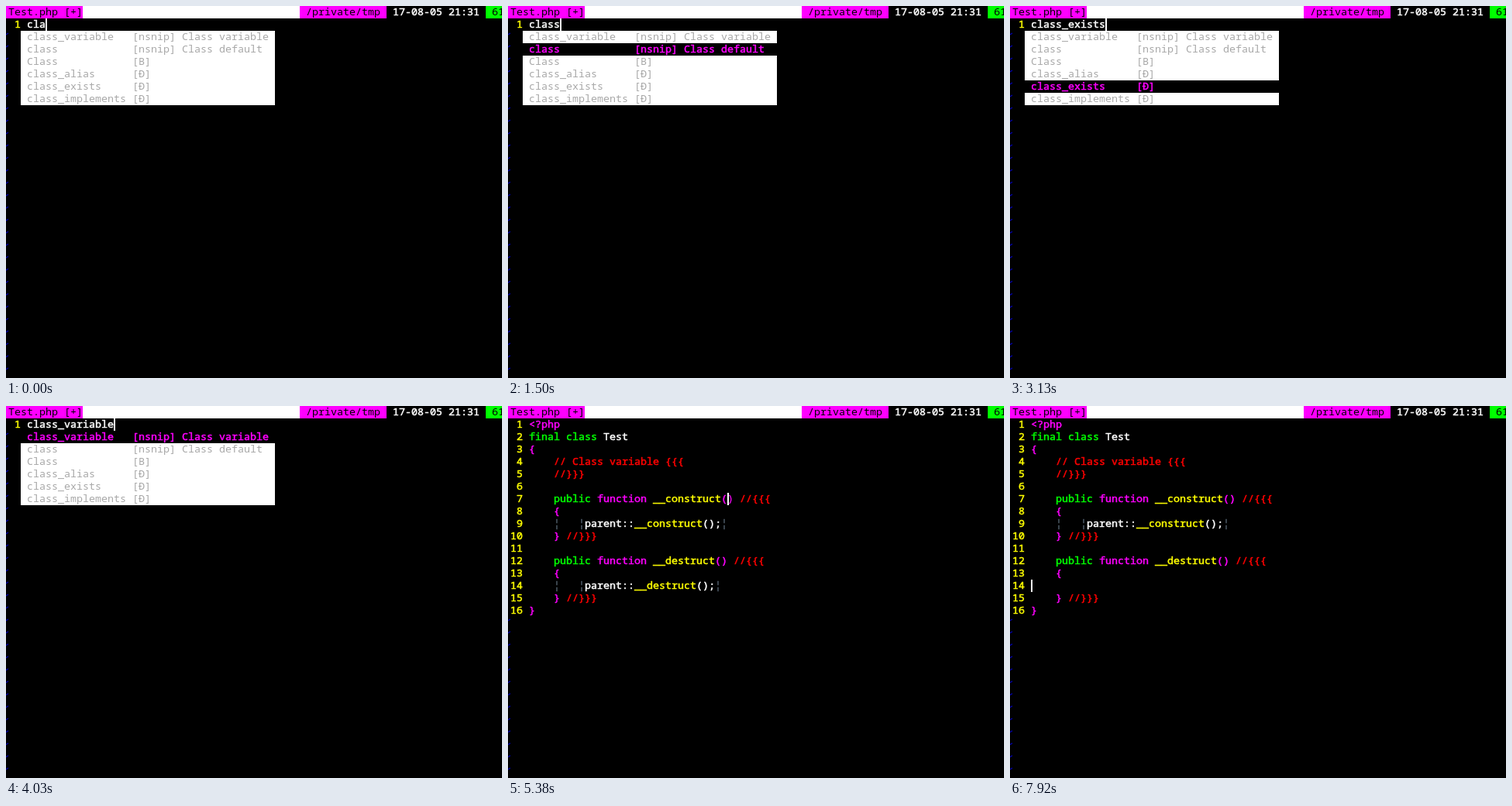
Animation of 640 by 480 pixels, one loop 8 s. Source, as an HTML page with a canvas:

```html
<!DOCTYPE html>
<html lang="en">
<head>
<meta charset="utf-8">
<title>Editor completion</title>
<style>
html, body { margin: 0; width: 100%; height: 100%; overflow: hidden; background: #000; }
canvas { display: block; }
</style>
</head>
<body>
<canvas id="stage" width="640" height="480"></canvas>
<script>
const ctx = document.getElementById('stage').getContext('2d');
const LOOP = 8000, CELL_W = 8, CELL_H = 16, LEFT = 3;
const WHITE = '#fff', BLACK = '#000', MAGENTA = '#f0f', GREEN = '#0f0';
const YELLOW = '#ff0', RED = '#f00', GREY = '#a8a8a8', GUIDE = '#4c5a66', BLUE = '#0000b0';
const THIN = 0, THICK = 0.5;

const menu = [
  ['class_variable', '[nsnip] Class variable'],
  ['class', '[nsnip] Class default'],
  ['Class', '[B]'],
  ['class_alias', '[Đ]'],
  ['class_exists', '[Đ]'],
  ['class_implements', '[Đ]']
];

// Menu choice from each time on; -1 means nothing is chosen.
const choices = [
  [0, -1], [1050, 0], [1500, 1], [2090, 2], [2240, 3],
  [3130, 4], [3430, 5], [3580, -1], [4030, 0], [4330, 1]
];
const cursorOff = [[750, 900], [2990, 3130], [5080, 5380], [6120, 6420]];

const EXPAND = 5380, VISUAL = 6570, PENDING = 7020, CLEARED = 7170;

function method(name) {
  return [
    [7, ['public ', GREEN], ['function ', MAGENTA], ['__' + name, YELLOW], ['() ', MAGENTA], ['//{{{', RED]],
    [7, ['{', MAGENTA]],
    [7, ['¦   ¦', GUIDE], ['parent::', WHITE], ['__' + name, YELLOW], ['();', WHITE], ['¦', GUIDE]],
    [7, ['} ', MAGENTA], ['//}}}', RED]]
  ];
}

const code = [
  [3, ['<?php', MAGENTA]],
  [3, ['final class ', GREEN], ['Test', WHITE]],
  [3, ['{', MAGENTA]],
  [7, ['// Class variable {{{', RED]],
  [7, ['//}}}', RED]],
  [3],
  ...method('construct'),
  [3],
  ...method('destruct'),
  [3, ['}', MAGENTA]]
];

const cellX = col => LEFT + col * CELL_W;

function rect(x, y, w, h, color) {
  ctx.fillStyle = color;
  ctx.fillRect(x, y, w, h);
}

function fillCells(col, row, count, color) {
  rect(cellX(col), row * CELL_H, count * CELL_W, CELL_H, color);
}

// Light text on black gets a fine outline, as font smoothing thickens it.
function write(text, col, row, color, outline = THICK) {
  ctx.font = '13.33px "Noto Sans Mono", "DejaVu Sans Mono", monospace';
  ctx.fillStyle = ctx.strokeStyle = color;
  ctx.lineWidth = outline || 1;
  ctx.lineJoin = 'round';
  const y = row * CELL_H + 12;
  [...text].forEach((ch, i) => {
    if (ch === ' ') return;
    ctx.fillText(ch, cellX(col + i), y);
    if (outline) ctx.strokeText(ch, cellX(col + i), y);
  });
}

function writeRuns([col, ...runs], row) {
  for (const [text, color] of runs) {
    write(text, col, row, color);
    col += text.length;
  }
}

function drawCursor(t, col, row) {
  if (cursorOff.some(([from, to]) => t >= from && t < to)) return;
  rect(cellX(col), row * CELL_H, 2, CELL_H, WHITE);
}

function drawStatus() {
  rect(0, 0, 640, CELL_H, WHITE);
  rect(0, 0, cellX(12), CELL_H, MAGENTA);
  write('Test.php [+]', 0, 0, BLACK, THIN);
  fillCells(47, 0, 14, MAGENTA);
  write('/private/tmp', 48, 0, BLACK, THIN);
  fillCells(61, 0, 16, BLACK);
  write('17-08-05 21:31', 62, 0, WHITE);
  fillCells(77, 0, 3, GREEN);
  write('61', 78, 0, BLACK, THIN);
}

// The visible tail of a tilde cut off by the left edge.
function drawTilde(row) {
  const y = row * CELL_H;
  ctx.strokeStyle = BLUE;
  ctx.lineWidth = 1.3;
  ctx.beginPath();
  ctx.moveTo(0, y + 5);
  ctx.lineTo(3, y + 3);
  ctx.stroke();
}

function drawLineNumbers(count) {
  for (let n = 1; n <= count; n++) write(String(n).padStart(2), 0, n, YELLOW);
  for (let row = count + 1; row < 30; row++) drawTilde(row);
}

function drawCompletion(t) {
  const chosen = choices.filter(([from]) => from <= t).pop()[1];
  const typed = chosen < 0 ? 'cla' : menu[chosen][0];
  drawLineNumbers(1);
  write(typed, 3, 1, WHITE);
  menu.forEach(([word, info], i) => {
    const row = i + 2, on = i === chosen;
    fillCells(2, row, 41, on ? BLACK : WHITE);
    write(word.padEnd(17) + info, 3, row, on ? MAGENTA : GREY, on ? THICK : THIN);
  });
  drawCursor(t, 3 + typed.length, 1);
}

function drawSelection(t) {
  const call = 'parent::__destruct()';
  const pending = t >= PENDING;
  fillCells(11, 14, call.length + (pending ? 1 : 0), GREY);
  write(call, 11, 14, YELLOW);
  write(';', 31, 14, pending ? YELLOW : WHITE);
  drawCursor(t, 31, 14);
}

function drawDedent(t) {
  const col = t < 7470 ? 11 : t < 7920 ? 7 : 3;
  fillCells(3, 14, col - 3, RED); // trailing blanks
  drawCursor(t, col, 14);
}

function drawCode(t) {
  drawLineNumbers(code.length);
  code.forEach((line, i) => {
    if (i !== 13 || t < VISUAL) writeRuns(line, i + 1);
  });
  if (t < VISUAL) {
    if (t < 6120) {
      fillCells(35, 7, 1, BLACK);
      write(')', 35, 7, '#c0c');
    }
    drawCursor(t, 35, 7);
  } else if (t < CLEARED) {
    drawSelection(t);
  } else {
    drawDedent(t);
  }
}

function draw(t) {
  rect(0, 0, 640, 480, BLACK);
  drawStatus();
  if (t < EXPAND) drawCompletion(t);
  else drawCode(t);
}

const start = performance.now();
function tick() {
  draw((performance.now() - start) % LOOP);
  requestAnimationFrame(tick);
}
tick();
</script>
</body>
</html>
```
